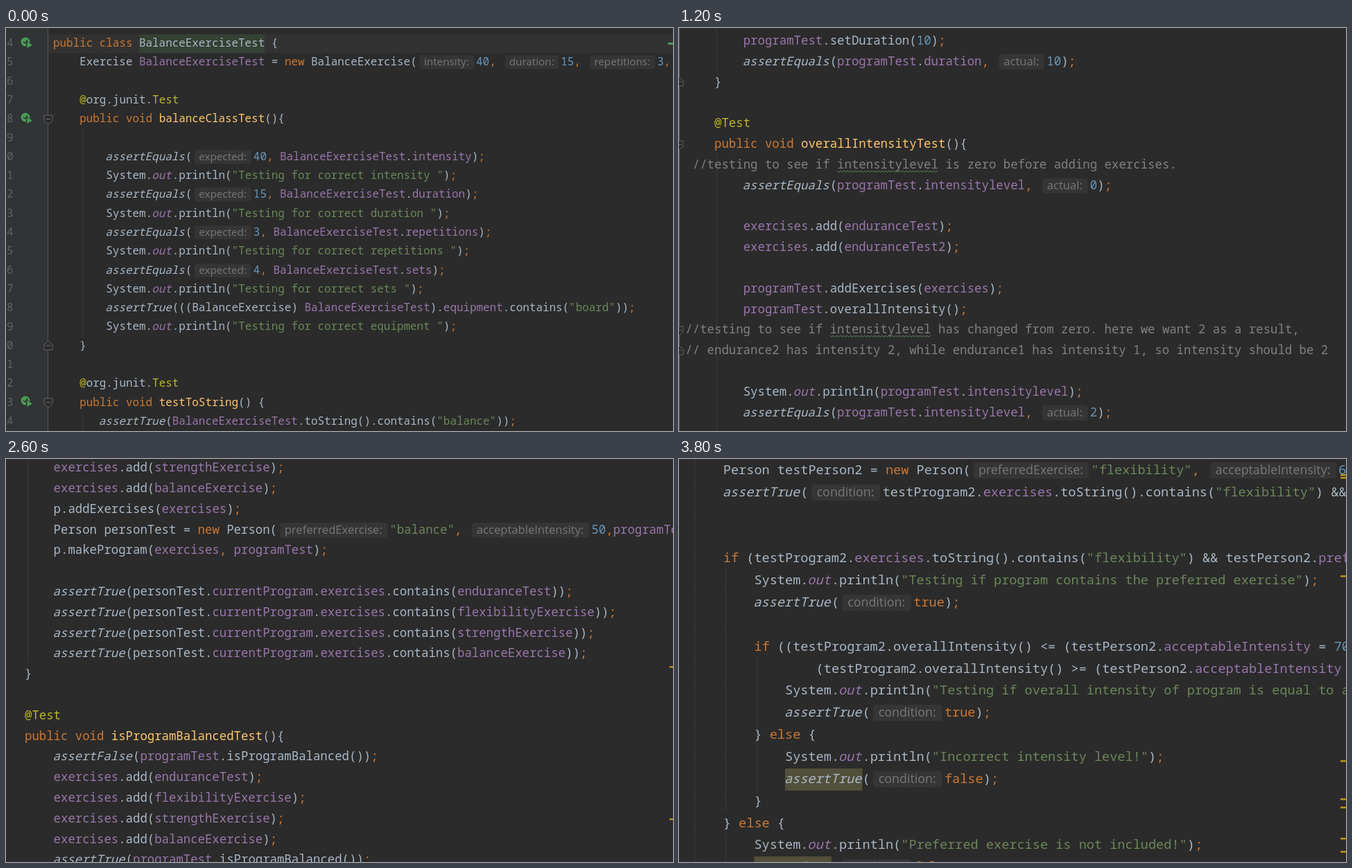
Write an HTML page with a canvas that moves like this. It is 962 px wide and 582 px high and loops after 4000 ms.

```html
<!DOCTYPE html>
<html lang="en">
<head>
<meta charset="utf-8">
<title>Exercise tests</title>
<style>
html, body { margin: 0; width: 100%; height: 100%; overflow: hidden; background: #2b2b2b; }
canvas { display: block; }
</style>
</head>
<body>
<canvas id="stage" width="962" height="582"></canvas>
<script>
const ctx = document.getElementById('stage').getContext('2d');
const W = 962, H = 582, STEP = 200;
const MONO = '"Noto Sans Mono", "DejaVu Sans Mono", monospace';
const SANS = '"Open Sans", "Noto Sans", sans-serif';
const C = {
  bg: '#2b2b2b', gutter: '#313335', text: '#a9b7c6', key: '#cc7832', decl: '#ffc66d',
  field: '#9876aa', str: '#6a8759', num: '#6897bb', note: '#bbb529', comment: '#808080',
  warn: '#be9117', line: '#555759', run: '#499c54'
};
// space taken by an inlay hint, in character widths
const HINT = {
  expected: 9.28, intensity: 8.95, duration: 8.8, repetitions: 10.57, actual: 7,
  preferredExercise: 15.6, acceptableIntensity: 17, condition: 9.62
};
const KEYS = /^(public|class|void|new|if|else|true|false)$/;
const STATIC = /^(assert(Equals|True|False)|sortExercise)$/;
const FIELDS = /^(exercises|programTest\w*|[a-z]+Exercise|\w+ExerciseTest\w*|enduranceTest2?|intensity|intensitylevel|duration|repetitions|sets|equipment|requirement|currentProgram|acceptableIntensity)$/;
const TOKEN = /\/\/.*|"[^"]*"?|~\w+~|\w+|\s+|[^\w\s]/g;

ctx.font = '500 100px ' + MONO;
const EM = 100 / ctx.measureText('M').width;

function rect(x, y, w, h, color) {
  ctx.fillStyle = color;
  ctx.fillRect(x, y, w, h);
}

function path(points, close) {
  ctx.beginPath();
  points.forEach(([x, y]) => ctx.lineTo(x, y));
  if (close) ctx.closePath();
}

function hint(name, x, y, cw) {
  const wide = HINT[name] * cw;
  ctx.fillStyle = '#353535';
  ctx.beginPath();
  ctx.roundRect(x + cw * .38, y - cw * 1.55, wide - cw * .7, cw * 2.1, 4);
  ctx.fill();
  ctx.font = `${cw * 1.6}px ${SANS}`;
  ctx.fillStyle = '#787878';
  ctx.textAlign = 'center';
  ctx.fillText(name + ':', x + wide / 2, y);
  ctx.textAlign = 'left';
  return wide;
}

function squiggle(x, y, w) {
  const points = [];
  for (let i = 0; i * 2.5 <= w; i++) points.push([x + i * 2.5, y + (i % 2 ? 2.5 : 0)]);
  path(points);
  ctx.strokeStyle = '#5c8a5c';
  ctx.lineWidth = 1;
  ctx.stroke();
}

function style(tok, prev) {
  if (tok[0] === '"') return [C.str];
  if (/^\d/.test(tok)) return [C.num];
  if (tok === '@' || tok === 'Test') return [C.note];
  if (tok === ',' || tok === ';' || KEYS.test(tok)) return [C.key];
  if (prev === 'void') return [C.decl];
  if (prev === 'class') return [C.text];
  if (STATIC.test(tok)) return [C.text, true];
  if (tok === 'out') return [C.field, true];
  return [FIELDS.test(tok) ? C.field : C.text];
}

function drawLine(line, x, y, s) {
  const { cw, lh } = s;
  const put = (text, color, italic) => {
    ctx.font = `${italic ? 'italic ' : ''}500 ${cw * EM}px ${MONO}`;
    ctx.fillStyle = color;
    // slanting leans to the right, so pull the word back a little
    ctx.fillText(text, italic ? x - cw * .1 : x, y);
    x += text.length * cw;
  };
  let prev = '', lit = false;
  for (const tok of line.match(TOKEN) || []) {
    if (tok === '|') { lit = !lit; continue; }
    if (tok[0] === '~') { x += hint(tok.slice(1, -1), x, y, cw); continue; }
    if (tok.startsWith('//')) {
      tok.split('^').forEach((part, i) => {
        if (i % 2) squiggle(x, y + cw * .28, part.length * cw);
        put(part, C.comment);
      });
      continue;
    }
    if (lit) rect(x, y - lh * .66, tok.length * cw, lh, s.lit || '#52503a');
    put(tok, ...style(tok, prev));
    if (tok.trim()) prev = tok;
  }
}

function fold([x, y, up]) {
  const d = up ? -1 : 1;
  path([[x - 6, y - 6 * d], [x + 6, y - 6 * d], [x + 6, y + 2 * d], [x, y + 7 * d], [x - 6, y + 2 * d]], true);
  ctx.fillStyle = C.bg;
  ctx.fill();
  ctx.strokeStyle = '#606366';
  ctx.lineWidth = 1;
  ctx.stroke();
  rect(x - 3, y - 1, 6, 1, '#707376');
}

function runIcon(y) {
  ctx.fillStyle = C.run;
  ctx.beginPath();
  ctx.arc(28, y - 2, 6.5, 0, 7);
  ctx.fill();
  path([[25, y - 2], [27.5, y], [31, y - 5]]);
  ctx.strokeStyle = C.gutter;
  ctx.lineWidth = 1.5;
  ctx.stroke();
  path([[29, y - 4], [39, y + 2.5], [29, y + 9]], true);
  ctx.fillStyle = C.gutter;
  ctx.fill();
  path([[30.5, y - 2], [38, y + 2.5], [30.5, y + 7]], true);
  ctx.fillStyle = C.run;
  ctx.fill();
}

function gutter(s) {
  rect(0, 0, 60, H, C.gutter);
  rect(61, 9, W - 61, 27, '#323232');
  ctx.font = `${s.cw * EM}px ${MONO}`;
  ctx.fillStyle = '#606366';
  ctx.textAlign = 'right';
  s.lines.forEach((_, i) => ctx.fillText(i + 4, 10.5, s.y + i * s.lh + 5));
  ctx.textAlign = 'left';
  [22, 131, 540].forEach(runIcon);
}

function draw(s) {
  rect(0, 0, W, H, C.bg);
  if (s.gutter) gutter(s);
  if (s.edge !== undefined) rect(s.edge, 0, 1, H, C.line);
  for (const [x, a, b] of s.guides || [])
    for (let y = a; y < b; y += 2) rect(x, y, 1, 1, '#4a4a4a');
  (s.folds || []).forEach(fold);
  s.lines.forEach((line, i) => drawLine(line, s.x, Math.round(s.y + i * s.lh + s.cw * .52), s));
  if (s.thumb) rect(955, 60, 7, 105, '#4d4d4d');
  for (const y of s.marks || []) rect(s.markX, y - 1, W - s.markX, 2.5, C.warn);
  for (const [x, y, color] of s.extra || []) rect(x, y - 1, W - x, 3, color);
}

const scene = (cw, x, y, lh, text, more) =>
  ({ cw, x, y, lh, lines: text.replace(/^\n/, '').split('\n'), ...more });
const pad = (n, lines) => lines.map(l => ' '.repeat(n) + l).join('\n');
const say = text => `System.out.println("${text}");`;

function checks(name, values, last) {
  const parts = ['intensity', 'duration', 'repetitions', 'sets'];
  const out = parts.flatMap((part, i) => [
    `assertEquals(~expected~${values[i]}, ${name}ExerciseTest.${part});`,
    say(`Testing for correct ${part} `)
  ]);
  return [...out, `assertTrue(((${name}Exercise) ${name}ExerciseTest).${last}"));`,
    say('Testing for correct equipment ')];
}

const sorted = (values, when) => values.flatMap((v, i) => [
  `assertEquals(~expected~${v}, ovelser.get(${i}).intensity);`,
  say(`Index ${i} is intensity ${v} ${when} sorting`)
]);
const adds = names => names.map(n => `exercises.add(${n});`);
const contains = (owner, names) => names.map(n => `assertTrue(${owner}.exercises.contains(${n}));`);
const others = ['Balance', 'Strength', 'Flexibility', 'Endurance'].map(k => k + 'ExerciseTestAnotherClass');
const locals = ['enduranceTest', 'flexibilityExercise', 'strengthExercise', 'balanceExercise'];

const classTest = (name, v, last) => `
Exercise ${name}ExerciseTest = new ${name}Exercise(~intensity~${v[0]}, ~duration~${v[1]}, ~repetitions~${v[2]},

@org.junit.Test
public void ${name.toLowerCase()}ClassTest(){
${pad(4, checks(name, v, last))}
    }

    @org.junit.Test
    public void testToString() {
       assertTrue(${name}ExerciseTest.toString().contains("${name.toLowerCase()}"));
        System.out.println("Testing toString");`;
const classLook = {
  edge: 0, guides: [[53, 109, H], [94, 519, H]],
  folds: [[0, 95], [0, 417, 1], [0, 506]]
};

const balance = scene(9.54, 68, 22, 27.3, `
public class |BalanceExerciseTest| {
    Exercise BalanceExerciseTest = new BalanceExercise(~intensity~40, ~duration~15, ~repetitions~3,

    @org.junit.Test
    public void balanceClassTest(){

${pad(8, checks('Balance', [40, 15, 3, 4], 'equipment.contains("board'))}
    }

    @org.junit.Test
    public void testToString() {
       assertTrue(BalanceExerciseTest.toString().contains("balance"));`, {
  gutter: true, edge: 60, lit: '#344134', guides: [[110, 146, 446], [110, 555, H]],
  folds: [[61, 132], [61, 459, 1], [61, 541]], extra: [[955, 22, C.run]]
});

const endurance = classTest('Endurance', [50, 30, 4, 3], 'equipment.contains("nothing');
const flexibility = scene(10.28, 49, 6, 29.32,
  classTest('Flexibility', [60, 20, 8, 3], 'requirement.contains("nothing').replace('Test = new', 'Test  = new'), classLook);
const strength = scene(10.28, 49, 6, 29.32,
  classTest('Strength', [70, 25, 6, 4], 'equipment.contains("weights'), classLook);

const programLook = { edge: 0, guides: [[54, 0, 62], [54, 182, H]] };
const programStart = scene(10.42, 9.3, 18.5, 29.82, `
    @Test
    public void addExercisesTest(){
${pad(8, [...adds(locals), '', 'programTest.addExercises(exercises);',
  ...contains('programTest', locals)])}
    }

    @Test
    public void setDurationTest(){
        programTest.setDuration(10);
        assertEquals(programTest.duration, ~actual~10);
    }`, programLook);

const program = scene(10.42, 9.3, 18.5, 29.82, `
        programTest.setDuration(10);
        assertEquals(programTest.duration, ~actual~10);
    }

    @Test
    public void overallIntensityTest(){
 //testing to see if ^intensitylevel^ is zero before adding exercises.
        assertEquals(programTest.intensitylevel, ~actual~0);

        exercises.add(enduranceTest);
        exercises.add(enduranceTest2);

        programTest.addExercises(exercises);
        programTest.overallIntensity();
//testing to see if ^intensitylevel^ has changed from zero. here we want 2 as a result,
// endurance2 has intensity 2, while endurance1 has intensity 1, so intensity should be 2

        System.out.println(programTest.intensitylevel);
        assertEquals(programTest.intensitylevel, ~actual~2);`, {
  ...programLook, folds: [[0, 78, 1], [0, 169], [0, 437], [0, 466, 1]]
});

const sortLook = { guides: [[7, 0, H], [8, 1, H]] };
const sortStart = scene(11.02, -40, 22, 31.47, `
    @Test
    public void sortExerciseTest(){
${pad(8, ['ovelser.add(e1);', 'ovelser.add(e2);', 'ovelser.add(e3);', 'ovelser.add(e4);', '',
  ...sorted([1, 4, 9, 3], 'before'), 'System.out.println("");'])}`, sortLook);

const sortMid = scene(11.02, -40, 22, 31.47, `
        ovelser.add(e4);

${pad(8, sorted([1, 4, 9, 3], 'before'))}
        System.out.println("");

//If you want to see the unsorted list of exercise after intensity you can remove the comment
//System.out.println("These are the unsorted exercises : \\n" + ^ovelser^);

        Program.sortExercise(ovelser);
${pad(8, sorted([1, 3, 4, 9], 'after').slice(0, 3))}`, sortLook);

const sortEnd = scene(10.6, -8, 20, 30.3, `
        Program.sortExercise(ovelser);
${pad(8, [...sorted([1, 3, 4, 9], 'after'), 'System.out.println("");'])}
    }

    @Test
    public void makeProgramTest(){
        Program p = new Program();
${pad(8, adds(locals))}`, { guides: [[38, 0, 315], [38, 420, H]] });

const person = 'Person personTest = new Person(~preferredExercise~"balance", ~acceptableIntensity~50,programTest);';
const personStart = scene(10.58, 34, 13, 30.18, `
@Test
public void makeProgramTest(){
${pad(4, ['Program p = new Program();', '', person, ...adds(locals), 'p.addExercises(exercises);',
  'p.makeProgram(exercises, programTest);', '',
  ...contains('personTest.currentProgram', [...locals].reverse())])}
}`, { guides: [[38, 58, 450]] });

const personMid = scene(10.58, 30.4, 13, 30.18, `
    ${person}
${pad(4, [...adds(locals), 'p.addExercises(exercises);', 'p.makeProgram(exercises, programTest);', '',
  ...contains('personTest.currentProgram', ['balanceExercise', 'strengthExercise', 'flexibilityExercise', 'enduranceTest'])])}

    assertFalse(personTest.currentProgram.exercises.contains(enduranceTest2));
}
@Test
public void giveProgramIsAssumedProgramAssignedTest(){
    Program p = new Program();

    exercises.add(enduranceTest);`, {
  guides: [[34, 0, 420], [34, 511, H]], markX: 959, marks: [328, 561]
});

const assigned = y => scene(10.4, 27, y, 29.8, `
@Test
public void giveProgramIsAssumedProgramAssignedTest(){
${pad(4, ['Program p = new Program();', '', ...adds(locals), 'p.addExercises(exercises);', person,
  'p.makeProgram(exercises, programTest);', '', ...contains('personTest.currentProgram', locals)])}
}

@Test
public void isProgramBalancedTest(){
    assertFalse(programTest.isProgramBalanced());
${pad(4, adds(locals))}
    assertTrue(programTest.isProgramBalanced());
}`, { guides: [[31, y + 45, y + 460]], markX: 957, marks: [300, 520] });

const extraLook = {
  markX: 948, marks: [48, 53, 183, 431, 481, 493, 534, 550],
  extra: [[948, 8, '#3592c4']], thumb: true
};
const integration = `
public void integrationTest () {

    programTestAnotherClass.setDuration(3);
    assertEquals(programTestAnotherClass.duration,~actual~3);

${pad(4, adds([others[0], others[3]]))}
    programTestAnotherClass.addExercises(exercises);
${pad(4, contains('programTestAnotherClass', [others[0], others[3]]))}
    assertEquals(programTestAnotherClass.intensitylevel, ~actual~0);

    assertFalse(programTestAnotherClass.isProgramBalanced());

${pad(4, adds(others))}

    programTestAnotherClass.addExercises(exercises);
    assertTrue(programTestAnotherClass.isProgramBalanced());

${pad(4, contains('programTestAnotherClass', others))}
}`;
const integrate = y => scene(10.29, 43.5, y, 29.47, integration,
  { ...extraLook, guides: [[47, Math.max(0, Math.round(y + 14)), H]] });

const personLines = `
Person testPerson2 = new Person(~preferredExercise~"flexibility", ~acceptableIntensity~60, testProgram2);
assertTrue(~condition~testProgram2.exercises.toString().contains("flexibility") && testPerson2.preferredExercise);


if (testProgram2.exercises.toString().contains("flexibility") && testPerson2.preferredExercise) {
    System.out.println("Testing if program contains the preferred exercise");
    assertTrue(~condition~true);

    if ((testProgram2.overallIntensity() <= (testPerson2.acceptableIntensity = 70
            (testProgram2.overallIntensity() >= (testPerson2.acceptableIntensity =
        System.out.println("Testing if overall intensity of program is equal to acceptable intensity");
        assertTrue(~condition~true);
    } else {
        System.out.println("Incorrect intensity level!");
        |assertTrue|(~condition~false);
    }
} else {
    System.out.println("Preferred exercise is not included!");
    |assertTrue|(~condition~false);`;
const personLook = { markX: 954, marks: [23, 27, 169, 436, 491, 503, 548, 567] };
const testPerson = scene(11.15, 63.8, 16, 31.86, personLines, {
  ...personLook,
  guides: [[22, 0, H], [67, 160, 510], [112, 288, 480], [67, 542, H]]
});
const personIntro = names => scene(11.15, 63.8, 16, 31.86,
  [...adds(names), 'testProgram2.addExercises(exercises);', ''].join('\n') + personLines,
  { ...personLook, guides: [[22, 0, H]] });

const scenes = [
  balance,
  scene(10.28, 49, 6, 29.32, endurance, classLook),
  scene(10.28, 49, -111, 29.32, endurance, { edge: 0, guides: [[53, 0, H]] }),
  flexibility, strength, programStart, program,
  sortStart, sortMid, sortEnd,
  personStart, personMid, assigned(13), assigned(-166), integrate(88),
  integrate(-.4), integrate(-206),
  personIntro(locals), personIntro(locals.slice(2)), testPerson
];

let shown = -1;
function tick(now) {
  const i = Math.floor(Math.max(0, now) / STEP) % scenes.length;
  if (i !== shown) draw(scenes[shown = i]);
  requestAnimationFrame(tick);
}
requestAnimationFrame(tick);
</script>
</body>
</html>
```
